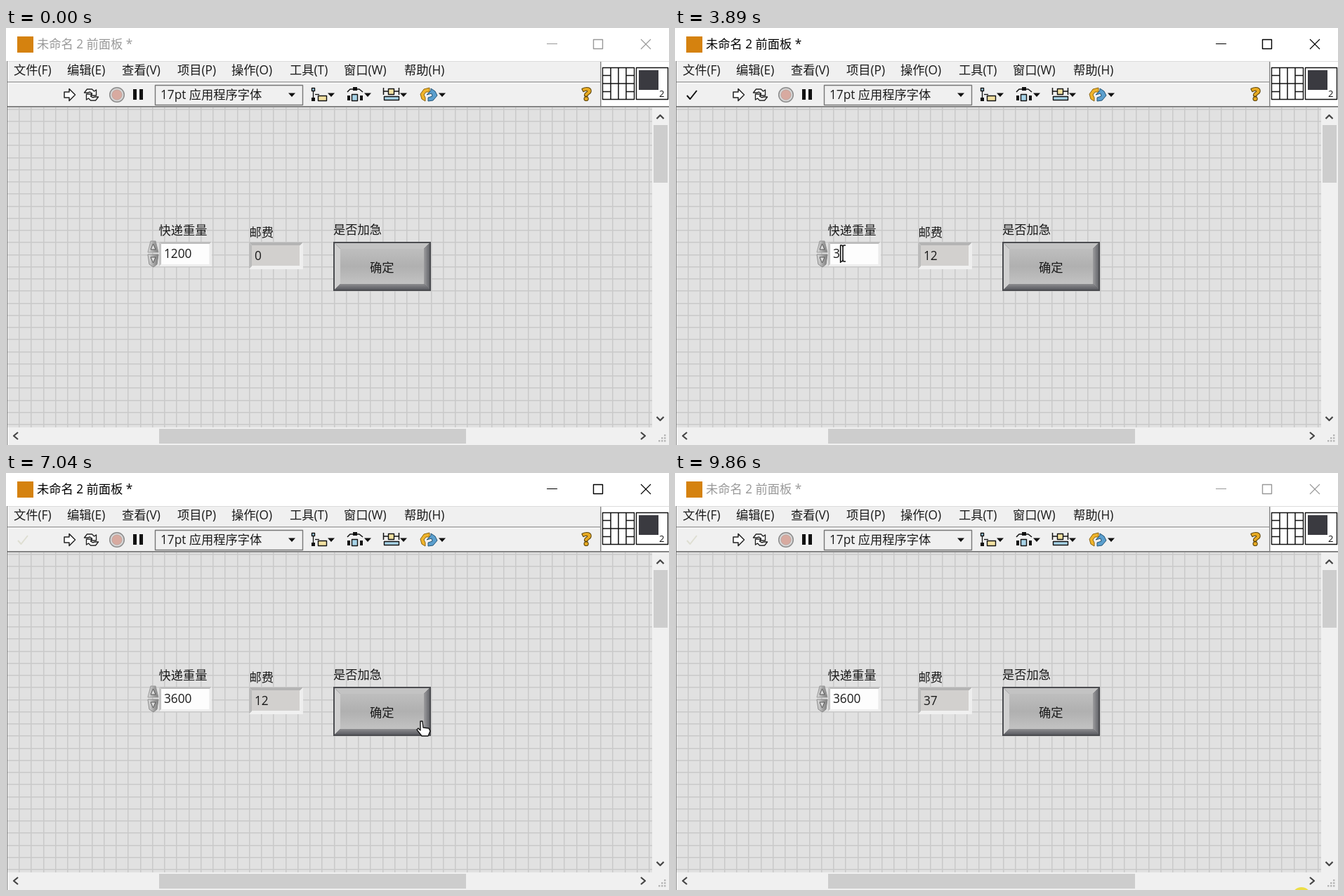
These frames come from a looping animation (944x593 px, 9930 ms). An HTML page with a canvas:

```html
<!DOCTYPE html>
<html lang="zh-CN">
<head>
<meta charset="utf-8">
<style>
html, body { margin: 0; width: 100%; height: 100%; overflow: hidden; background: #fff; }
canvas { display: block; }
</style>
</head>
<body>
<canvas id="stage" width="944" height="593"></canvas>
<script>
const c = document.getElementById('stage').getContext('2d');
const LOOP = 9930, STEP = LOOP / 148;
const FONT = '"Open Sans","Noto Sans CJK SC","Noto Sans CJK JP",sans-serif';

// Pointer path: time, x, y
const PATH = [
  [0, 893, 640], [260, 893, 640], [270, 795, 549], [540, 500, 355], [810, 235, 180],
  [1000, 122, 108], [1150, 92, 92], [2210, 92, 92], [2400, 250, 300], [2540, 323, 354],
  [2620, 340, 354], [2900, 262, 326], [3150, 239, 320], [4830, 239, 320], [4890, 248, 328],
  [5100, 260, 332], [5400, 450, 376], [5600, 560, 384], [5900, 518, 342], [6170, 518, 342],
  [6310, 600, 361], [6570, 604, 363], [6800, 638, 382], [7040, 592, 354], [7450, 592, 354],
  [7640, 502, 288], [7820, 240, 180], [7980, 92, 106], [8720, 92, 106], [9000, 420, 290],
  [9320, 893, 603], [LOOP, 893, 603]
];

function rect(x, y, w, h, fill, stroke) {
  if (fill) { c.fillStyle = fill; c.fillRect(x, y, w, h); }
  if (stroke) { c.strokeStyle = stroke; c.lineWidth = 1.4; c.strokeRect(x + .5, y + .5, w - 1, h - 1); }
}

function text(s, x, y, color = '#1a1a1a', size = 17.25, weight = 400) {
  c.font = `${weight} ${size}px ${FONT}`;
  c.fillStyle = color;
  c.fillText(s, x, y);
}

function poly(pts, fill, stroke, width = 1.5, closed = true) {
  c.beginPath();
  for (let i = 0; i < pts.length; i += 2) c.lineTo(pts[i], pts[i + 1]);
  if (closed) c.closePath();
  if (fill) { c.fillStyle = fill; c.fill(); }
  if (stroke) { c.strokeStyle = stroke; c.lineWidth = width; c.stroke(); }
}

const line = (pts, color, width) => poly(pts, null, color, width, false);

function gradient(x0, y0, x1, y1, ...colors) {
  const g = c.createLinearGradient(x0, y0, x1, y1);
  colors.forEach((k, i) => g.addColorStop(i / (colors.length - 1), k));
  return g;
}

function disc(x, y, r, fill, stroke, width = 1.5) {
  c.beginPath();
  c.arc(x, y, r, 0, 7);
  if (fill) { c.fillStyle = fill; c.fill(); }
  if (stroke) { c.strokeStyle = stroke; c.lineWidth = width; c.stroke(); }
}

const dropMark = (x, y) => poly([x - 5, y - 2.5, x + 5, y - 2.5, x, y + 3], '#111');

function titleBar(active) {
  const ink = active ? '#000' : '#999';
  rect(0, 0, 944, 47, '#fff');
  rect(16, 12, 23, 23, '#d5820f');
  text('未命名 2 前面板 *', 44, 29, ink);
  line([770, 22.5, 785, 22.5], ink, 1);
  rect(836, 16, 14, 14, null, ink);
  line([904, 16, 918, 30], ink, 1.1);
  line([918, 16, 904, 30], ink, 1.1);
}

function toolbar() {
  rect(1, 47, 943, 66, '#f0f0f0');
  rect(0, 47, 944, 1, '#dcdcdc');
  [['文件(F)', 11], ['编辑(E)', 87], ['查看(V)', 165], ['项目(P)', 244], ['操作(O)', 321],
   ['工具(T)', 404], ['窗口(W)', 481], ['帮助(H)', 567]].forEach(([s, x]) => text(s, x, 66));
  rect(1, 76, 846, 1.5, '#a5a5a5');
  rect(1, 78, 846, 1, '#fff');

  // Repeat-run loop, stop and pause
  c.lineJoin = 'round';
  for (const a of [0, Math.PI]) {
    c.save();
    c.translate(121.5, 95);
    c.rotate(a);
    poly([-10, -3, -6, -8, 1, -8, 4, -5, 7, -7, 7, 1, -1, 1, 1, -2, -2, -4, -5, -3], '#fff', '#222', 1.4);
    c.restore();
  }
  disc(158, 95, 10.3, '#d6d6d6', '#8c8c8c');
  disc(158, 95, 7, '#d8aaa0', '#c2a39c', 1);
  rect(181, 87, 5, 15, '#111');
  rect(190, 87, 5, 15, '#111');

  rect(212, 81, 211, 29, '#f0f0f0', '#777');
  text('17pt 应用程序字体', 220, 101);
  dropMark(407, 95);

  // Align, distribute, resize and reorder
  rect(435, 85, 5, 5, '#9fd0e8', '#111');
  rect(435, 99, 5, 5, '#111');
  line([437.5, 90, 437.5, 99], '#111', 1.3);
  line([440, 94.5, 446, 94.5], '#111', 1.3);
  rect(444, 96, 13, 8, '#f3e2a2', '#111');
  dropMark(463, 95);
  line([486, 91, 490, 87, 503, 87, 508, 91], '#111', 1.6);
  rect(494, 84, 6, 5, '#111');
  rect(486, 96, 4, 7, '#111');
  rect(492, 94, 9, 10, '#a8d4e8', '#111');
  rect(504, 96, 4, 7, '#111');
  dropMark(515, 95);
  rect(544, 86, 9, 9, '#f3e2a2', '#111');
  line([537, 90, 544, 90], '#111', 1.5);
  line([553, 90, 560, 90], '#111', 1.5);
  line([537.5, 85, 537.5, 95], '#111', 1.5);
  line([559.5, 85, 559.5, 95], '#111', 1.5);
  rect(538, 97, 22, 6, '#a8d4e8', '#111');
  dropMark(566, 95);
  poly([603, 85, 595, 87, 590, 94, 592, 101, 597, 104, 597, 99, 595, 95, 598, 91, 603, 91], '#f0b429', '#8a6414', 1);
  poly([599, 95, 605, 89, 605, 86, 611, 90, 614, 96, 608, 103, 601, 104, 601, 99, 607, 97, 606, 93], '#5b9fce', '#245475', 1);
  dropMark(621, 95);

  c.font = `800 25px ${FONT}`;
  c.strokeStyle = '#5a430b';
  c.lineWidth = 2.2;
  c.strokeText('?', 820.5, 103);
  text('?', 820.5, 103, '#e8ab22', 25, 800);

  // Connector pane and panel badge
  rect(846, 48, 98, 64, '#fff');
  rect(846, 48, 1.5, 64, '#8a8a8a');
  rect(849, 56, 46, 46, '#fff', '#111');
  for (const x of [861, 872, 883]) line([x, 56, x, 102], '#111', 1.5);
  for (const y of [67.5, 79, 90.5]) {
    line([849, y, 861, y], '#111', 1.5);
    line([883, y, 895, y], '#111', 1.5);
  }
  line([861, 79, 883, 79], '#111', 1.5);
  rect(897, 56, 46, 46, '#fff', '#111');
  rect(901, 60, 28, 28, '#3a3a40');
  text('2', 930, 98, '#111', 13);
  rect(1, 111, 943, 1.7, '#747474');
}

function panel() {
  rect(1, 113, 919, 455, '#e1e1e1');
  for (let x = 18; x < 920; x += 17.25) rect(Math.round(x), 113, 1.5, 455, '#c9c9c9');
  for (let y = 114.5; y < 568; y += 17.25) rect(1, Math.round(y), 919, 1.5, '#c9c9c9');
  rect(920, 113, 24, 480, '#f0f0f0');
  rect(1, 568, 943, 25, '#f0f0f0');
  rect(922, 138, 20, 82, '#cdcdcd');
  rect(218, 570, 437, 21, '#cdcdcd');
  line([926.5, 129, 931.5, 124, 936.5, 129], '#444', 2.2);
  line([926.5, 553, 931.5, 558, 936.5, 553], '#444', 2.2);
  line([17, 575, 11, 580, 17, 585], '#444', 2.2);
  line([904, 575, 910, 580, 904, 585], '#444', 2.2);
  for (let i = 0; i < 3; i++)
    for (let j = 0; j <= i; j++) rect(937 - j * 4, 578 + i * 4, 2.4, 2.4, '#b5b5b5');
  rect(0, 47, 1, 546, '#fff');
  rect(1, 47, 1, 546, '#777');
}

function bevel(x, y, w, h, d, top, left, right, bottom) {
  poly([x, y, x + w, y, x + w - d, y + d, x + d, y + d], top);
  poly([x, y, x + d, y + d, x + d, y + h - d, x, y + h], left);
  poly([x + w, y, x + w, y + h, x + w - d, y + h - d, x + w - d, y + d], right);
  poly([x, y + h, x + d, y + h - d, x + w - d, y + h - d, x + w, y + h], bottom);
}

function controls(t) {
  text('快递重量', 217.5, 294);
  text('邮费', 346.5, 297);
  text('是否加急', 466, 293);

  const metal = gradient(201, 0, 218, 0, '#e8e8e8', '#aaa', '#777');
  poly([206, 303, 213, 303, 217, 319, 202, 319], metal, '#999', 1);
  poly([202, 322, 217, 322, 215, 336, 210, 340, 204, 336], metal, '#888', 1);
  poly([206, 315, 213, 315, 209.5, 307], '#ddd', '#555', 1);
  poly([206, 326, 213, 326, 209.5, 334], '#ddd', '#555', 1);
  rect(218, 304, 75, 35, '#f2f2f2');
  bevel(218, 304, 75, 35, 3, '#bdbdbd', '#c4c4c4', '#ececec', '#eee');
  rect(221, 307, 68, 29, '#fdfdfd');

  const value = t < 3890 ? '1200' : '3600'.slice(0, t < 4090 ? 1 : t < 4290 ? 2 : t < 4420 ? 3 : 4);
  const selected = t >= 3150 && t < 3890;
  if (selected) rect(223, 309, 44, 25, '#000');
  text(value, 225, 327, selected ? '#fff' : '#1a1a1a');
  if (t >= 3890 && t < 4830) rect(225 + c.measureText(value).width, 309, 1.5, 25, '#000');

  rect(346, 305, 77, 38, '#eee');
  bevel(346, 305, 77, 38, 4, '#b4b4b4', '#bbb', '#eee', '#f0f0f0');
  rect(350, 309, 68, 29, '#d2d0ce');
  text(t < 1420 ? '0' : t < 8310 ? '12' : '37', 354, 330);

  const dark = t >= 7240 && t < 8310;
  rect(466, 304, 139, 70, '#4b4c50');
  if (dark) bevel(468, 306, 135, 66, 9, '#858585', '#787878', '#696969', '#555');
  else bevel(468, 306, 135, 66, 9, '#c3c3c3', '#d0d0d0', gradient(594, 0, 603, 0, '#a3a3a5', '#66676c'),
             gradient(0, 363, 0, 372, '#939395', '#5b5c62'));
  rect(476, 314, 119, 50, dark ? gradient(0, 314, 0, 364, '#888', '#929292', '#9f9f9f')
                               : gradient(0, 314, 0, 364, '#bebebe', '#b0b0b0', '#c2c2c2'));
  if (t >= 5830 && t < 6640) {
    rect(517, 328, 37, 25, '#fff');
    rect(518, 329, 1.5, 23, '#000');
  }
  text('确定', 518, 346.5);

  const handle = (x, y, s) => rect(x - s / 2, y - s / 2, s, s, '#0b78d0');
  if (t >= 2400 && t < 2610) [220, 290].forEach(x => handle(x, 321, 8));
  if (t >= 7640 && t < 8310)
    for (const x of [467, 502, 537]) { handle(x, 275, 5); handle(x, 297, 5); }
}

function runState(t, x, y) {
  const hot = y < 113 && Math.abs(x - 91) < 16;
  if (hot) rect(77, 81, 28, 29, '#edf4fa', '#2f8fd8');
  const busy = (t >= 1420 && t < 1480) || (t >= 8310 && t < 8380);
  poly([83, 91, 90, 91, 90, 86.5, 98.5, 95, 90, 103.5, 90, 99, 83, 99], busy ? '#222' : '#fff', '#222', 1.5);
  if (t >= 3150) {
    const editing = t < 5300 || (t >= 5830 && t < 6640);
    line([17, 96, 21.5, 101, 31, 89], editing ? '#111' : '#deded2', 2);
  }
}

function pointer(t, x, y) {
  const click = (t >= 1350 && t < 1480) || (t >= 8250 && t < 8380) || t >= 9860;
  if (click) {
    c.globalCompositeOperation = 'multiply';
    disc(x - 1, t < 9000 ? 95 : y, 14, '#fbec4a');
    c.globalCompositeOperation = 'source-over';
  }
  const inField = x > 219 && x < 292 && y > 305 && y < 338;
  const onCaption = t >= 5830 && t < 6240;
  c.save();
  c.translate(x, y);
  if (y < 113) {
    if (t < 2300) c.scale(.76, .76);
    poly([0, 0, 0, 22, 5, 17.5, 9, 26, 13, 24, 9, 16, 16, 16], '#d5e9f7', '#111', 1.6);
  } else if (inField || onCaption) {
    line([-4, -11, -1, -11, 0, -9, 1, -11, 4, -11], '#111', 1.5);
    line([0, -9, 0, 10], '#111', 1.6);
    line([-4, 12, -1, 12, 0, 10, 1, 12, 4, 12], '#111', 1.5);
  } else if (x > 467 && x < 604 && y > 305 && y < 373) {
    poly([-2, -1, 1, -1, 2, 8, 10, 9, 12, 13, 9, 20, 0, 20, -7, 11, -5, 9, -2, 12], '#fff', '#111', 1.4);
  } else {
    line([-8, 0, 8, 0], '#111', 1.6);
    line([0, -8, 0, 8], '#111', 1.6);
    disc(7.5, -6.5, 1.2, null, '#111', 1);
  }
  c.restore();
}

function draw(now) {
  const t = Math.floor((now % LOOP) / STEP + .15) * STEP + 12;
  const i = Math.max(1, PATH.findIndex(p => p[0] > t));
  const [t0, x0, y0] = PATH[t >= LOOP ? PATH.length - 2 : i - 1];
  const [t1, x1, y1] = PATH[t >= LOOP ? PATH.length - 1 : i];
  const k = Math.min(1, (t - t0) / (t1 - t0));
  const x = x0 + (x1 - x0) * k, y = y0 + (y1 - y0) * k;
  titleBar(t >= 1350 && t < 9860);
  toolbar();
  panel();
  runState(t, x, y);
  controls(t);
  pointer(t, x, y);
}

const start = performance.now();
(function tick() {
  draw(performance.now() - start);
  requestAnimationFrame(tick);
})();
</script>
</body>
</html>
```
